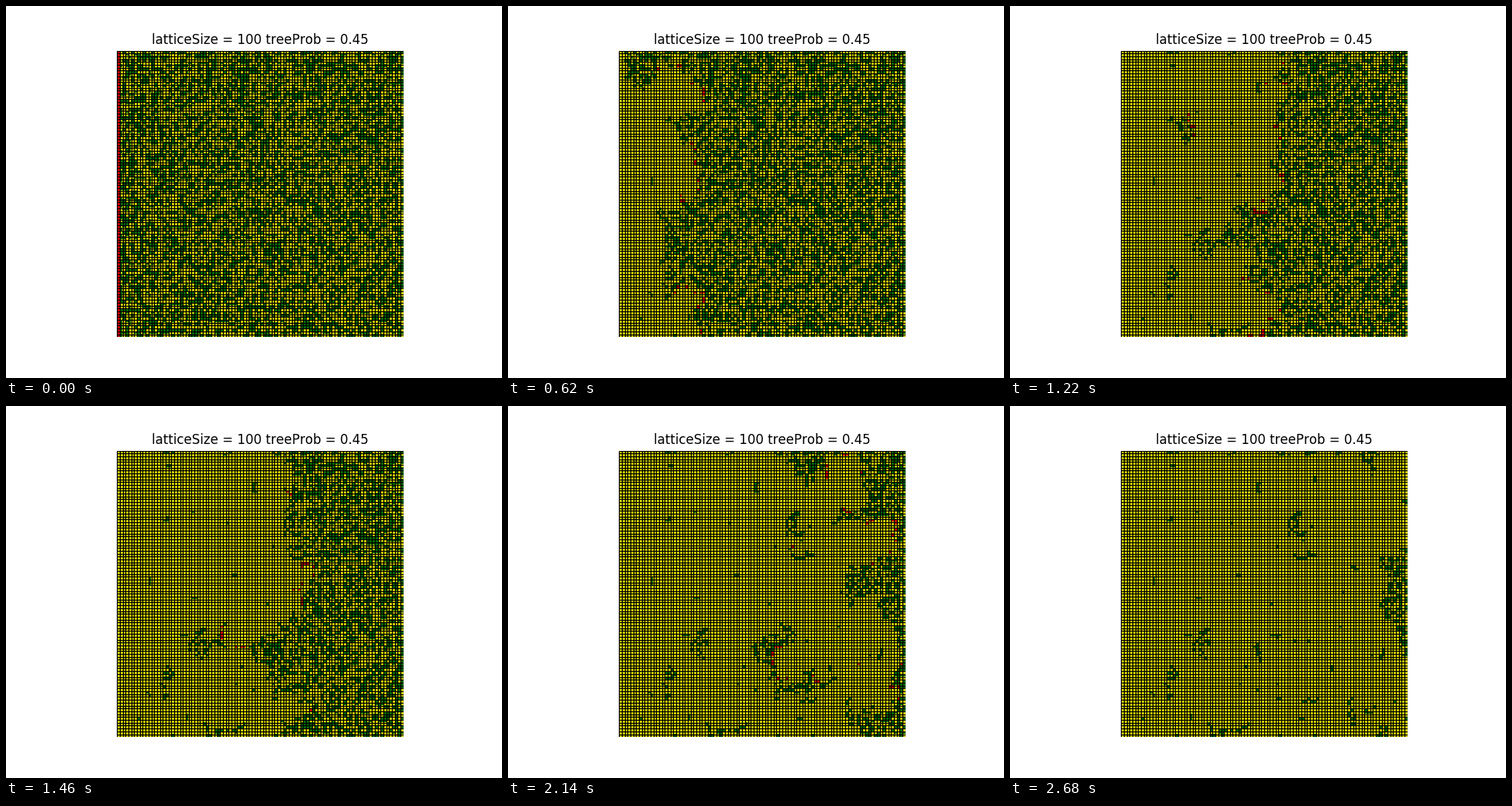
A matplotlib script that plays this animation: 640 px wide and 480 px high, repeating every 2700 ms.

```python
import numpy as np
import matplotlib.pyplot as plt
from matplotlib.animation import FuncAnimation
from matplotlib.collections import LineCollection
from matplotlib.colors import ListedColormap

SIZE = 100
TREE_PROB = 0.45
FRAMES = 135
TREE, FIRE, BARE = range(3)


def plant(seed):
    trees = np.random.default_rng(seed).random((SIZE, SIZE)) < TREE_PROB
    trees[:, 0] = True
    return trees


def burn(trees):
    """Step at which each tree burns; the fire spreads to all eight neighbours."""
    times = np.full(trees.shape, np.inf)
    fire = np.zeros_like(trees)
    fire[:, 0] = True
    step = 0
    while fire.any():
        times[fire] = step
        near = np.pad(fire, 1)
        near = near[:-2] | near[1:-1] | near[2:]
        near = near[:, :-2] | near[:, 1:-1] | near[:, 2:]
        fire = near & trees & np.isinf(times)
        step += 1
    return times


def misfit(seed):
    """How far a fire is from a steady pace that dies out as the loop ends."""
    trees = plant(seed)
    times = burn(trees)
    steps = np.arange(FRAMES)
    counts = np.bincount(times[np.isfinite(times)].astype(int), minlength=FRAMES)
    burnt = np.cumsum(counts)[:FRAMES] / trees.sum()
    pace = np.minimum(0.008 * steps, 0.93)
    last = len(np.trim_zeros(counts, "b")) - 1
    return np.abs(burnt - pace).mean() + abs(last - (FRAMES - 2)) / 100


trees = plant(min(range(200), key=misfit))
times = burn(trees)


def lattice(step):
    state = np.full((SIZE, SIZE), BARE)
    state[trees & (times > step)] = TREE
    state[times == step] = FIRE
    return state


# Loose letter spacing in the title
plt.rcParams["text.kerning_factor"] = 6

fig, ax = plt.subplots(figsize=(6.4, 4.8), dpi=100)
image = ax.imshow(lattice(0), cmap=ListedColormap(["green", "red", "yellow"]),
                  vmin=TREE, vmax=BARE, interpolation="nearest",
                  extent=(0, SIZE, SIZE, 0))
ticks = range(SIZE + 1)
lines = [[(k, 0), (k, SIZE)] for k in ticks] + [[(0, k), (SIZE, k)] for k in ticks]
ax.add_collection(LineCollection(lines, colors="black", linewidths=1, snap=True),
                  autolim=False)
ax.set_title(f"latticeSize = {SIZE} treeProb = {TREE_PROB}",
             fontfamily="DejaVu Sans", fontsize=12)
ax.axis("off")


def update(step):
    image.set_data(lattice(step))
    return [image]


anim = FuncAnimation(fig, update, frames=FRAMES, interval=20, repeat=True,
                     repeat_delay=0, blit=False)
plt.show()
```
